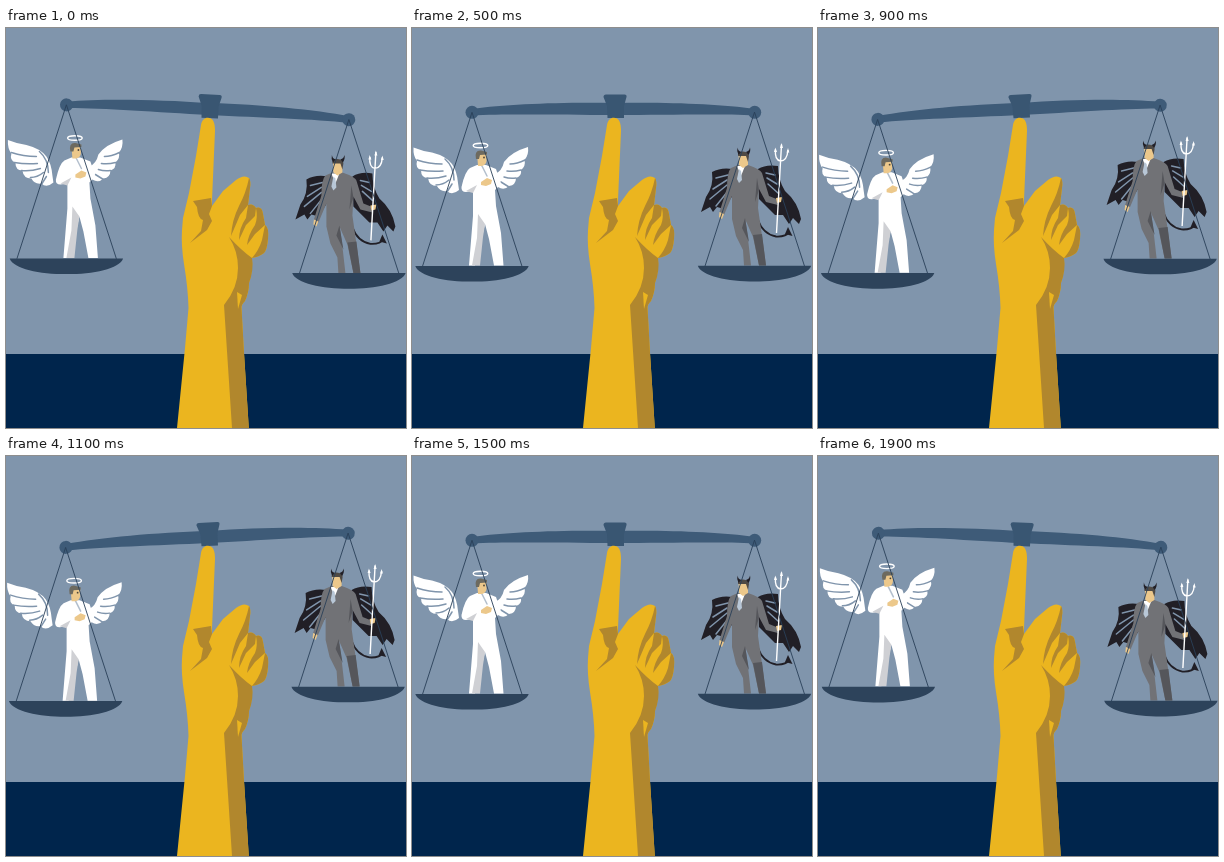
Write an HTML page without scripts that moves like this. It is 400 by 400 pixels and loops after 2000 ms.

```html
<!DOCTYPE html>
<html lang="en">
<head>
<meta charset="utf-8">
<title>Scales</title>
<style>
  @property --t { syntax: "<number>"; inherits: true; initial-value: 0; }
  html, body { margin: 0; width: 100%; height: 100%; overflow: hidden; background: #8095ac; }
  svg { display: block; width: 100%; height: 100%; animation: swing 2s steps(20) infinite; }
  @keyframes swing { from { --t: 0; } to { --t: 20; } }

  /* a pendulum swing, ten poses per second */
  .beam, .pan { --s: cos(var(--t) * 18deg); }
  .beam { transform-origin: 202px 90px; transform: rotate(calc(var(--s) * 3deg)); }
  .left { transform: translate(calc(var(--s) * .4px), calc(var(--s) * -7.5px)); }
  .right { transform: translate(calc(var(--s) * .4px), calc(var(--s) * 7.4px)); }

  .steel { fill: #3e5b78; }
  .block { fill: #395672; }
  .plate { fill: #2d435b; }
  .rope { fill: none; stroke: #2a4058; stroke-width: .9; }
  .gold { fill: #ebb51f; }
  .shade { fill: #b1872d; }
  .white { fill: #fff; }
  .skin { fill: #ecc88b; }
  .black { fill: #211f26; }
  .suit { fill: #717276; }
  .dark { fill: #55565b; }
  .gap { fill: none; stroke: #8095ac; stroke-width: 1.5; stroke-linecap: round; }
  .line { fill: none; stroke: #fff; stroke-width: 1.4; }
</style>
</head>
<body>
<svg viewBox="0 0 400 400" preserveAspectRatio="none">
  <defs>
    <!-- ropes and plate, hung from 0,0 -->
    <g id="tray">
      <path class="plate" d="M-56.7 153.6H56.7C53 164 27 169.3 0 169.3S-53 164-56.7 153.6Z"/>
      <path class="rope" d="M-49.500 154L0 0L50 154"/>
    </g>
  </defs>

  <rect width="400" height="400" fill="#8095ac"/>
  <rect y="326" width="400" height="74" fill="#00254c"/>

  <g class="beam">
    <path class="steel" d="M60 81C95 76 150 74 203 75C256 74 308 76 343 81V87.500C308 85.500 256 87 203 87C150 87 95 85.500 60 87.500Z"/>
    <circle class="steel" cx="60" cy="84.300" r="6.500"/>
    <circle class="steel" cx="342.700" cy="84.300" r="6.500"/>
    <path class="block" d="M191.500 69Q191.500 66.500 194 66.500H212.500Q215 66.500 214.500 69L212 78L212 90H195.500L195 78Z"/>
  </g>

  <!-- hand -->
  <path class="gold" d="M195 97C196 91 200 89 203 90C207 90 209 95 209 103L206 172L206 178L217 163L230 152Q238 146 243 150Q245 153 244 160L242 177Q247 175 250 180Q256 178 257 186L259 197Q263 199 262 211Q261 222 258 225Q253 229 246 230Q247 243 243 255Q243 264 239 273Q235 277 235.500 280L238 325L242.800 400H171L179 320L182.500 280Q182 260 178 236Q175 217 176 202L177 190L183 165L190 128Z"/>
  <g class="shade">
    <path d="M187 173L205 170L206 178L203 186L206 193L201 202L184 215L195 203L197 192Q192 191 191 179Z"/>
    <path d="M218 277Q232 260 232 240Q232 223 223 209Q236 223 246 230Q248 242 243 255Q243 264 239 273Q235 277 235.500 280L238 325L242.800 400H226Z"/>
    <path d="M243 150Q245 153 244 160L242 177L234 187L225 208Q226 192 233 178Q240 165 243 150Z"/>
    <path d="M242 177Q247 175 250 180L249 188L240 197L233 212Q233 200 240 190Z"/>
    <path d="M250 180Q256 178 257 186L259 197L249 206L241 217Q242 207 249 197Q252 190 250 180Z"/>
    <path d="M259 197Q263 199 262 211Q261 222 258 225Q253 229 246 230Q253 222 256 212Z"/>
  </g>
  <path class="gold" d="M231 264L236 267L232 281Z"/>

  <g class="pan left">
    <!-- angel -->
    <path class="white" d="M1.500 119.500Q10 123 20 124.500Q34 128 40 136Q45 143 46 155L47 162Q40 168 35 163Q28 164 25 158Q17 158 16 150Q9 150 9 142Q3 140 5 133Q1 128 1.500 119.500Z"/>
    <path class="gap" d="M5 132Q17 136 30 136M8 142Q19 144 31 143M15 150Q24 151 34 148M24 157Q31 157 37 152M35 164L40 156M33 131Q42 139 42 152"/>
    <path class="white" d="M116 119Q117 127 112.500 132Q114 138 109 142Q110 148 104 150Q104 157 97 158Q92 163 86 159L83 146Q90 143 92 134Q99 124 116 119Z"/>
    <path class="gap" d="M113 132Q105 136 98 136M109 142Q102 144 95 143M104 150Q98 151 92 149M97 159L89 154"/>
    <path class="white" d="M65 137L58 140Q53 143 49.500 159Q49 164 54 164L61 163L61 188L57 237.500H63L71 205L73 196L77 211L82 237.500H91.500L89 205L84 178L83 162L89 156L84 141L74 137Z"/>
    <path fill="#cfd0d4" d="M66 186L73 196L71 209L68 237.500H60L65 210ZM54 163L65 157L61 165Z"/>
    <path class="skin" d="M69 154L75 150L80 152L79 156L74 158L69 157Z"/>
    <path class="gap" stroke-opacity=".6" d="M70 138L75 148"/>
    <path class="skin" d="M65 125H74.500V133Q74 137 70 138H66Z"/>
    <path fill="#6d6a5f" d="M64 131Q62 122 69 122.500L75 124V126.500L68 127L67 131Z"/>
    <circle cx="72" cy="129.500" r=".9" fill="#4d4638"/>
    <ellipse class="line" cx="68.500" cy="117.500" rx="7.300" ry="2.300"/>
    <use href="#tray" x="60" y="84.300"/>
  </g>

  <g class="pan right">
    <!-- devil -->
    <path class="black" d="M321 141Q309 139 300 144Q302 158 294 169L289 184L298 179L301 184L305 179L312 181L321 167Z"/>
    <path class="gap" d="M316 147L304 150M315 152L301 161M315 157L298 171M316 163L304 178"/>
    <path class="black" d="M346 141Q354 136 366 138Q366 152 373 163Q386 174 389 191L387 196L381 190L377 196L371 187L363 187L347 171Z"/>
    <path class="gap" stroke-width="1" d="M354 145L363 147M355 150L365 156M356 156L366 165"/>
    <path d="M346 192Q351 206 364 208.500Q374 209 377 204" fill="none" stroke="#211f26" stroke-width="1.800"/>
    <path class="black" d="M376 199L380.500 208L373 206Z"/>
    <path class="suit" d="M326 137L319 140Q315 144 315 160L307.500 184L312 187L320 168L320 191L324 208L331 222L332 237.500H339L336 211L333.500 192L341 209L347 237.500H354L350 208L346 180L347 161L354 174L366 177L367 172L357 168L350 145Q348 141 336 137Z"/>
    <path class="dark" d="M341 207L350 206L354 237.500H347ZM333 190L337 214L330 200ZM345 150L347 162L343 174Z"/>
    <path class="white" d="M325 138L333 138L329 148Z"/>
    <path fill="#b8c7d7" d="M327 141L329 143L330 152L327 155L325 151Z"/>
    <path class="skin" d="M326.500 125H336V137L331 140L327 137ZM307.500 184L312 186L310 191L307 189ZM364 170L370 169L369 174L365 175Z"/>
    <path fill="#4f4a45" d="M326 128Q326 123 331 123.500Q337 124 337 128L336 134L334 128Z"/>
    <path class="black" d="M325.500 119.500Q326 123 329 124L326.500 127Q324.500 123 325.500 119.500ZM338 119.500Q337.500 123 334 124L336.500 127Q339 123 338 119.500Z"/>
    <path class="line" d="M369.500 116.500L364.500 205M363.500 121.500Q362.500 132 368.500 133Q375 133 376 122"/>
    <path class="white" d="M363.300 119.500L365 124H362ZM369.500 115L371 120H368ZM376 120L377.300 124.500H374.500Z"/>
    <use href="#tray" x="342.500" y="84.100"/>
  </g>
</svg>
</body>
</html>
```
